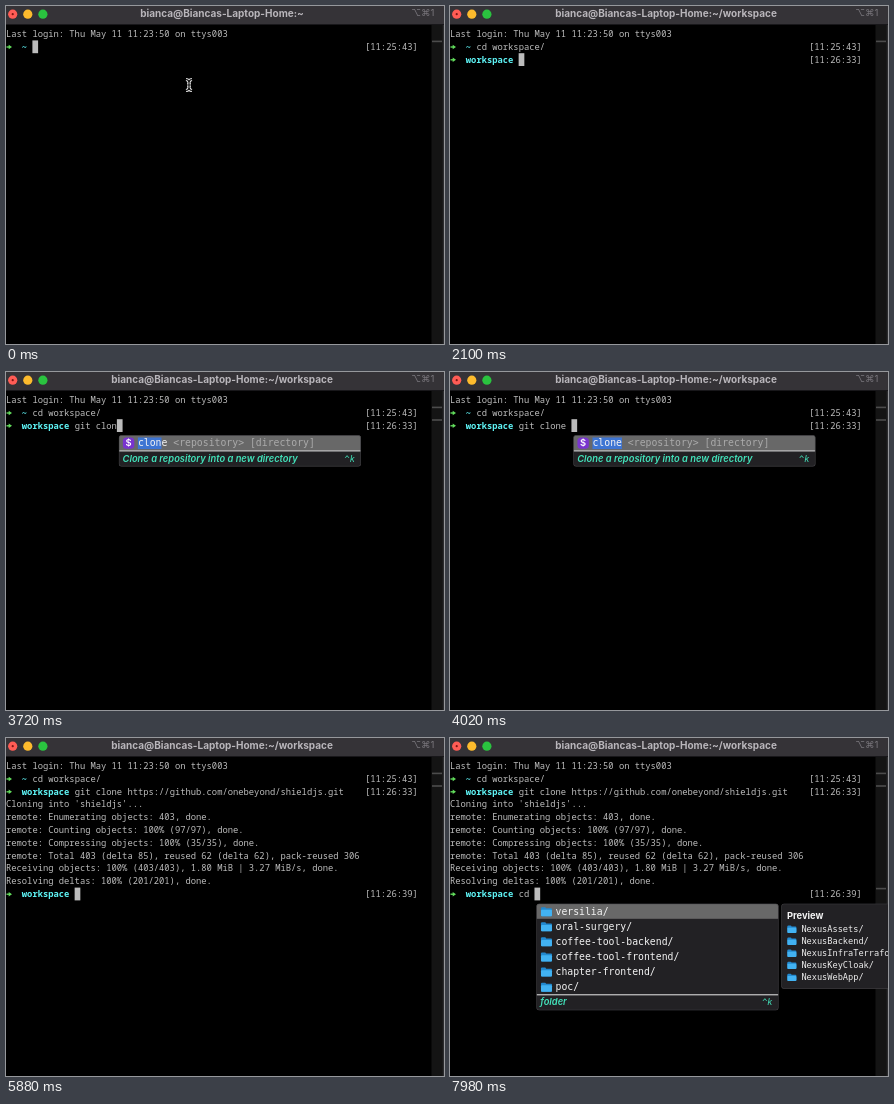
Animation, 438 px wide and 338 px high, one loop 8 s. Source, as an HTML page with a canvas:

```html
<!DOCTYPE html>
<html lang="en">
<head>
<meta charset="utf-8">
<title>Terminal autocomplete</title>
<style>
html, body { margin: 0; width: 100%; height: 100%; overflow: hidden; background: #000; }
canvas { display: block; width: 438px; height: 338px; }
</style>
</head>
<body>
<canvas id="stage"></canvas>
<script>
const W = 438, H = 338, LOOP = 8000;
const CELL = 5.28, LINE = 12.8, ROW = 15.1, POPUP_W = 242;
const TERM = '8.8px "Noto Sans Mono", monospace';
const LIST = '9.8px "DejaVu Sans Mono", monospace';
const SMALL = '8.62px "DejaVu Sans Mono", monospace';
const UI = 'Inter, sans-serif';
const GREY = '#bdbdbd', CYAN = '#5ff4f6', TEAL = '#43e3bb';

const HOME = 'bianca@Biancas-Laptop-Home:~';
const CLONE = 'git clone https://github.com/onebeyond/shieldjs.git';

const homeMenu = {
  items: ['workspace/', '.ssh/', 'Applications/', 'Desktop/', 'Documents/', 'Downloads/'],
  hint: 'folder',
  preview: ['budget-tracker-app/', 'chapter-frontend/', 'coffee-tool-backend/',
    'coffee-tool-frontend/', 'coffee-tool-frontend-\nold/', 'db-perry-colson/'],
  height: 106.6, scrollbar: true
};
const workMenu = {
  items: ['versilia/', 'oral-surgery/', 'coffee-tool-backend/', 'coffee-tool-frontend/',
    'chapter-frontend/', 'poc/'],
  hint: 'folder',
  preview: ['NexusAssets/', 'NexusBackend/', 'NexusInfraTerraform/', 'NexusKeyCloak/', 'NexusWebApp/'],
  height: 85
};
const gitItems = ['pull [remote] [branch]', 'checkout [branch, file, tag or commit]',
  'merge [branch...]', 'clone <repository> [directory]', 'push [remote] [branch]', 'apply <patch...>'];
const gitHints = {
  pull: 'Integrate with another repository',
  checkout: 'Switch branches or restore files',
  clone: 'Clone a repository into a new directory'
};

// Time of appearance and text of each output line
const output = [
  [5040, "Cloning into 'shieldjs'..."],
  [5580, 'remote: Enumerating objects: 403, done.'],
  [5580, 'remote: Counting objects: 100% (97/97), done.'],
  [5580, 'remote: Compressing objects: 100% (35/35), done.'],
  [5640, 'remote: Total 403 (delta 85), reused 62 (delta 62), pack-reused 306'],
  [5700, 'Receiving objects: 100% (403/403), 1.80 MiB | 3.27 MiB/s, done.'],
  [5760, 'Resolving deltas: 100% (201/201), done.']
];

const canvas = document.getElementById('stage');
const ctx = canvas.getContext('2d');
const dpr = window.devicePixelRatio || 1;
canvas.width = W * dpr;
canvas.height = H * dpr;

const rowY = row => 28 + row * LINE;
const within = (t, from, to) => t >= from && t < to;

function rect(x, y, w, h, color) {
  ctx.fillStyle = color;
  ctx.fillRect(x, y, w, h);
}

function round(x, y, w, h, r, color) {
  ctx.beginPath();
  ctx.roundRect(x, y, w, h, r);
  ctx.fillStyle = color;
  ctx.fill();
}

function dot(x, y, r, color) {
  ctx.beginPath();
  ctx.arc(x, y, r, 0, 7);
  ctx.fillStyle = color;
  ctx.fill();
}

// y is the middle of the line
function text(str, x, y, font, color, align = 'left') {
  ctx.font = font;
  ctx.fillStyle = color;
  ctx.textAlign = align;
  ctx.fillText(str, x, y + 2.9);
}

const term = (str, col, row, color = GREY, weight = '') =>
  text(str, col * CELL, rowY(row), weight + TERM, color);

function caret(col, row) {
  rect(col * CELL, rowY(row) - 6.4, 5.7, 12.8, '#bcbcbc');
}

function prompt(row, dir, command, clock) {
  const y = rowY(row);
  ctx.beginPath();
  ctx.moveTo(0.5, y + 0.2);
  ctx.lineTo(3.5, y + 0.2);
  ctx.strokeStyle = '#62dd5c';
  ctx.lineWidth = 1.4;
  ctx.stroke();
  ctx.beginPath();
  ctx.moveTo(2.7, y - 2.1);
  ctx.lineTo(6, y + 0.2);
  ctx.lineTo(2.7, y + 2.5);
  ctx.fillStyle = '#62dd5c';
  ctx.fill();
  term(dir, 3, row, CYAN, 'bold ');
  term(command, 4 + dir.length, row);
  term(`[${clock}]`, 68, row);
}

// Part of str typed by time t, one character per entry in times
const typed = (str, times, t) => str.slice(0, times.filter(at => t >= at).length);

function folder(x, y, w, h) {
  round(x, y - h / 2, w * 0.45, h * 0.5, 1, '#2289cf');
  round(x, y - h / 2 + h * 0.13, w, h * 0.87, 1, '#2289cf');
  round(x, y - h / 2 + h * 0.3, w, h * 0.7, 1, '#42b2f2');
}

function panel(x, y, w, h, paint) {
  ctx.save();
  ctx.beginPath();
  ctx.roundRect(x, y, w, h, 2.5);
  ctx.fillStyle = '#222124';
  ctx.fill();
  ctx.clip();
  paint();
  ctx.beginPath();
  ctx.roundRect(x, y, w, h, 2.5);
  ctx.strokeStyle = '#434245';
  ctx.lineWidth = 1;
  ctx.stroke();
  ctx.restore();
}

function popup(col, row, { items, hint, git, match = '' }) {
  const x = col * CELL + 2, y = rowY(row) + 9.7, base = y + items.length * ROW;
  panel(x, y, POPUP_W, items.length * ROW + 16, () => {
    rect(x, y, POPUP_W, ROW, '#686868');
    items.forEach((item, i) => {
      const mid = y + (i + 0.5) * ROW + 0.4, [name, ...args] = item.split(' ');
      const left = x + 19, step = 5.9;
      if (git) {
        round(x + 4, mid - 5.8, 11.4, 11.4, 3.5, '#7934cf');
        text('$', x + 9.7, mid, `600 9.4px ${UI}`, '#fff', 'center');
      } else {
        folder(x + 4.5, mid, 11, 9);
      }
      if (match) rect(left, mid - 5.8, match.length * step, 11.6, '#3e75d3');
      text(name, left, mid, LIST, '#f4f4f4');
      text(args.join(' '), left + (name.length + 1) * step, mid, LIST, i ? '#929292' : '#aaa');
    });
    rect(x, base, POPUP_W, 1, '#e8e8e8');
    text(hint, x + 3.7, base + 8.2, `italic 600 9.35px ${UI}`, TEAL);
    text('^k', x + POPUP_W - 6, base + 8.2, 'italic 8.6px "DejaVu Sans Mono", monospace', TEAL, 'right');
  });
}

function preview(col, row, { preview: names, height, scrollbar }) {
  const x = col * CELL + POPUP_W + 4.9, y = rowY(row) + 9.7;
  panel(x, y, scrollbar ? 147 : 160, height, () => {
    text('Preview', x + 5.5, y + 12.2, `bold 9.4px ${UI}`, '#f4f4f4');
    let mid = y + 25.5;
    for (const name of names) {
      const parts = name.split('\n');
      folder(x + 6, mid + (parts.length - 1) * 6, 9, 7.4);
      for (const part of parts) {
        text(part, x + 20, mid, SMALL, '#ececec');
        mid += 12.05;
      }
    }
    if (scrollbar) rect(429, y, 8, height, '#f3f3f3');
  });
}

function chrome(t) {
  rect(0, 0, W, H, '#000');
  rect(0, 0, W, 18.5, '#353337');
  rect(0, 18, W, 1, '#18171a');
  dot(6.7, 8.2, 4.6, '#ff5c55');
  dot(6.7, 8.2, 1.1, '#7c1512');
  dot(21.8, 8.2, 4.6, '#fdbb2d');
  dot(36.9, 8.2, 4.6, '#2ac33f');
  const title = t < 1920 ? HOME : within(t, 4980, 5760) ? CLONE : HOME + '/workspace';
  text(title, 216, 8, `bold 10px ${UI}`, '#b9b6bb', 'center');
  text('⌥⌘1', 428.5, 7.5, '9.6px Inter, "DejaVu Sans", sans-serif', '#79767c', 'right');
  rect(425.5, 19, 11, H, '#141414');
  rect(436.5, 19, 1.5, H, '#2b2b2d');
  [[0, 34.6], [2220, 47.2], [5940, 149.8]].forEach(([at, y]) => {
    if (t >= at) rect(426, y, 10, 1.6, '#4c4c4c');
  });
}

function pointer(x, y) {
  for (const [width, color] of [[3.2, '#eee'], [1.2, '#111']]) {
    ctx.beginPath();
    ctx.moveTo(x - 3, y - 5.5);
    ctx.quadraticCurveTo(x, y - 5.2, x, y - 2.5);
    ctx.quadraticCurveTo(x, y - 5.2, x + 3, y - 5.5);
    ctx.moveTo(x, y - 3);
    ctx.lineTo(x, y + 3);
    ctx.moveTo(x - 3, y + 5.5);
    ctx.quadraticCurveTo(x, y + 5.2, x, y + 2.5);
    ctx.quadraticCurveTo(x, y + 5.2, x + 3, y + 5.5);
    ctx.moveTo(x - 2, y);
    ctx.lineTo(x + 2, y);
    ctx.strokeStyle = color;
    ctx.lineWidth = width;
    ctx.stroke();
  }
}

function goToWorkspace(t) {
  const command = t >= 1620 ? 'cd workspace/' : typed('cd ', [540, 660, 840], t);
  prompt(1, '~', command, '11:25:43');
  if (t < 1860) caret(5 + command.length, 1);
  else if (t < 1920) caret(0, 2);
  if (within(t, 960, 1620)) popup(8, 1, homeMenu);
  if (within(t, 1080, 1620)) preview(8, 1, homeMenu);
}

function cloneProject(t) {
  const times = [2400, 2520, 2640, 2820, 3300, 3420, 3540, 3660, 3780, 3960];
  const command = t >= 4260 ? CLONE : typed('git clone ', times, t);
  const col = 13 + command.length;
  prompt(2, 'workspace', command, '11:26:33');
  const shown = output.filter(([at]) => t >= at);
  shown.forEach(([, line], i) => term(line, 0, 3 + i));
  if (t < 4980) caret(col, 2);
  else if (t < 5820) caret(0, 3 + shown.length);
  if (within(t, 2940, 4080)) {
    const match = command.slice(4).trim();
    const items = gitItems.filter(item => item.startsWith(match));
    popup(col, 2, { items, match, git: true, hint: gitHints[items[0].split(' ')[0]] });
  }
}

function enterProject(t) {
  const command = typed('cd ', [6960, 7080, 7260], t);
  prompt(10, 'workspace', command, '11:26:39');
  caret(13 + command.length, 10);
  if (t >= 7380) popup(16, 10, workMenu);
  if (t >= 7500) preview(16, 10, workMenu);
}

function draw(t) {
  ctx.setTransform(dpr, 0, 0, dpr, 0, 0);
  chrome(t);
  term('Last login: Thu May 11 11:23:50 on ttys003', 0, 0);
  goToWorkspace(t);
  if (t >= 1920) cloneProject(t);
  if (t >= 5820) enterProject(t);
  if (t < 120) pointer(183, 79);
}

const start = performance.now();
function tick() {
  draw((performance.now() - start) % LOOP);
  requestAnimationFrame(tick);
}
tick();
</script>
</body>
</html>
```
